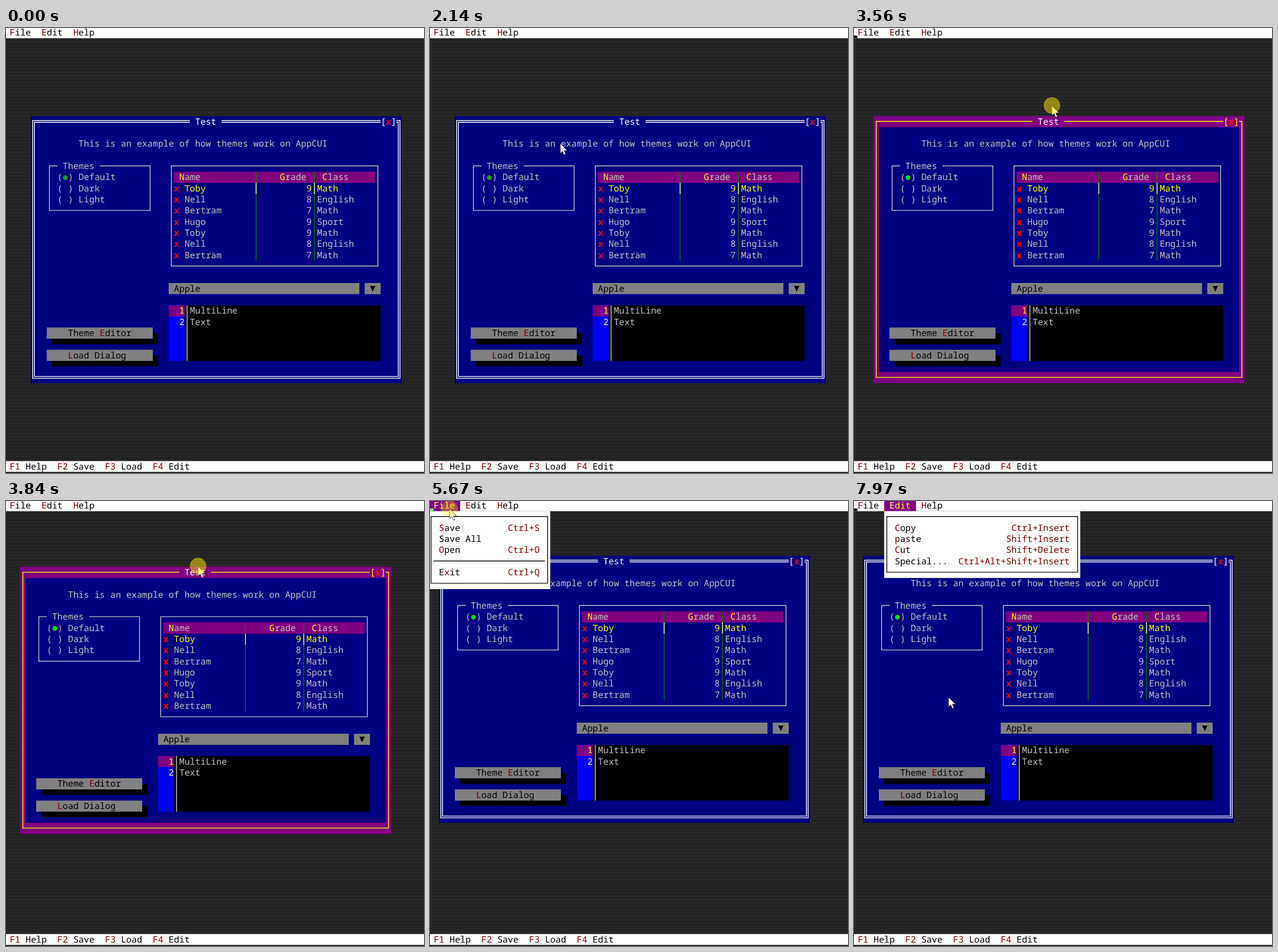
Recreate the animation shown at these times as an HTML page. Size 725 by 773 pixels, loop 8000 ms.

```html
<!DOCTYPE html>
<html lang="en">
<head>
<meta charset="utf-8">
<title>Theme demo</title>
<style>
html, body { margin: 0; width: 100%; height: 100%; overflow: hidden; background: #1e1e1e; }
svg { display: block; width: 725px; height: 773px; }
text { font: 15.32px "Noto Sans Mono", "DejaVu Sans Mono", monospace; white-space: pre; text-rendering: geometricPrecision; }
.line { fill: none; stroke-width: 1.4; }
.cross text { font-weight: 600; }
.bg { opacity: 0; }
.on > .bg { opacity: 1; }
.on text { fill: #ff0; }
.on tspan { fill: #ffffa0; }
</style>
</head>
<body>
<svg id="stage" viewBox="0 0 725 773"></svg>
<script>
// The screen is a grid of text cells.
const CW = 9.19, CH = 19.33, LEFT = -2.8, TOP = -1.6;
const X = c => +(c * CW + LEFT).toFixed(2);
const Y = r => +(r * CH + TOP).toFixed(2);
const midX = c => X(c + .5);
const midY = r => Y(r) + 9.2;
const colAt = x => Math.floor((x - LEFT) / CW);
const rowAt = y => Math.floor((y - TOP) / CH);

const SILVER = '#c0c0c0', NAVY = '#000080', PURPLE = '#800080', GRAY = '#808080',
      YELLOW = '#ffff00', MAROON = '#800000', RED = '#ff0000', INK = '#101018';

const box = (x0, y0, x1, y1, fill, cls = '') =>
  `<rect class="${cls}" x="${x0}" y="${y0}" width="${x1 - x0}" height="${y1 - y0}" fill="${fill}"/>`;
const cells = (c0, r0, c1, r1, fill, cls) => box(X(c0), Y(r0), X(c1), Y(r1), fill, cls);
const line = (d, color) => `<path class="line" d="${d}" stroke="${color}"/>`;
const frame = (c0, r0, c1, r1, color) =>
  line(`M${midX(c0)} ${midY(r0)}H${midX(c1)}V${midY(r1)}H${midX(c0)}Z`, color);

// One letter, at index hot, may take another colour.
function text(c, r, s, fill, hot = -1, hotFill = MAROON) {
  const body = hot < 0 ? s
    : `${s.slice(0, hot)}<tspan fill="${hotFill}">${s[hot]}</tspan>${s.slice(hot + 1)}`;
  return `<text x="${X(c)}" y="${Y(r) + 14.6}" fill="${fill}">${body}</text>`;
}
const cross = (c, r) => `<g class="cross">${text(c, r, 'x', RED)}</g>`;

// Window outline with gaps for the title and the close button; o moves it outward.
function outline(o) {
  const t = midY(8) - o;
  return `M${X(35)} ${t}H${midX(5) - o}V${midY(31) + o}H${midX(74) + o}V${t}H${X(74)}M${X(41)} ${t}H${X(71)}`;
}
const border = (id, back, path, color) => `<g id="${id}">${cells(5, 8, 75, 32, back)}
  ${cells(6, 9, 74, 31, NAVY)}${line(path, color)}${text(71, 8, '[ ]', color)}${cross(72, 8)}</g>`;

function themes() {
  const t = midY(12);
  return line(`M${X(10)} ${t}H${midX(8)}V${midY(16)}H${midX(27)}V${t}H${X(18)}`, SILVER)
    + text(11, 12, 'Themes', SILVER)
    + ['Default', 'Dark', 'Light'].map((s, i) => text(10, 13 + i, '( ) ' + s, SILVER)).join('')
    + `<circle id="dot" cx="${midX(11)}" cy="${Y(13) + 10.2}" r="4.2"/>`;
}

function list() {
  const pupils = [['Toby', 9, 'Math'], ['Nell', 8, 'English'], ['Bertram', 7, 'Math'], ['Hugo', 9, 'Sport']];
  let out = frame(31, 12, 70, 21, SILVER) + cells(32, 13, 70, 14, PURPLE)
    + text(33, 13, 'Name', SILVER, 0, YELLOW)
    + text(52, 13, 'Grade', SILVER, 0, YELLOW)
    + text(60, 13, 'Class', SILVER, 0, YELLOW);
  for (const c of [47, 58])
    out += line(`M${midX(c)} ${Y(13)}V${Y(21)}`, '#007800')
      + line(`M${midX(c)} ${Y(14)}V${Y(15)}`, '#ffff70');
  for (let i = 0; i < 7; i++) {
    const [name, grade, course] = pupils[i % 4], r = 14 + i, fill = i ? SILVER : YELLOW;
    out += cross(32, r) + text(34, r, name, fill)
      + text(57, r, String(grade), fill) + text(59, r, course, fill);
  }
  return out;
}

const combo = () => cells(31, 23, 67, 24, GRAY) + text(32, 23, 'Apple', '#000')
  + cells(68, 23, 71, 24, GRAY)
  + `<path d="M${midX(69) - 4.8} ${Y(23) + 5}h9.6l-4.8 10z"/>`;

const editor = () => cells(31, 25, 71, 30, '#000')
  + cells(31, 25, 34, 30, '#0000ff') + cells(31, 25, 34, 26, PURPLE)
  + line(`M${midX(34)} ${Y(25)}V${Y(30)}`, '#d8d0c0')
  + text(33, 25, '1', YELLOW) + text(33, 26, '2', '#fff')
  + text(35, 25, 'MultiLine', SILVER) + text(35, 26, 'Text', SILVER);

const button = (r, s, hot) => cells(9, r + .5, 29, r + 1.5, '#000')
  + cells(8, r, 28, r + 1, GRAY) + text(12, r, s, '#000', hot);

// An item is a label, its hot letter and a shortcut; an empty one is a rule.
function menu(id, c0, c1, items) {
  const last = items.length + 2;
  const rows = items.map(([label, hot, keys], i) => {
    const r = i + 2;
    if (!label) return line(`M${X(c0 + 1)} ${midY(r)}H${X(c1)}`, INK);
    return `<g class="item" data-row="${r}">${cells(c0 + 1, r, c1, r + 1, PURPLE, 'bg')}
      ${text(c0 + 2, r, label, '#000', hot)}${text(c1 - 1 - keys.length, r, keys, MAROON)}</g>`;
  });
  return `<g id="${id}">${cells(c0, 1, c1 + 1, last + 1, '#fff')}${frame(c0, 1, c1, last, INK)}${rows.join('')}</g>`;
}

const barItem = (id, c, s) =>
  `<g id="${id}">${cells(c - 1, 0, c + 5, 1, PURPLE, 'bg')}${text(c, 0, s, '#000', 0)}</g>`;
const hints = ['Help', 'Save', 'Load', 'Edit'].map((s, i) =>
  text(1 + 9 * i, 39, 'F' + (i + 1), MAROON) + text(4 + 9 * i, 39, s, '#000')).join('');

const el = id => document.getElementById(id);
el('stage').innerHTML = `
  <defs><pattern id="shade" width="${CW / 4}" height="${CH / 8}" patternUnits="userSpaceOnUse">
    <rect width="3" height="3" fill="#161616"/><rect width="3" height="1.2" fill="#343434"/></pattern></defs>
  <rect width="725" height="773" fill="url(#shade)"/>
  <g id="win">${border('still', NAVY, outline(1.5) + outline(-1.5), '#fff')}
    ${border('held', PURPLE, outline(0), YELLOW)}${text(36, 8, 'Test', '#fff')}
    ${text(14, 10, 'This is an example of how themes work on AppCUI', SILVER)}
    ${themes()}${list()}${combo()}${editor()}
    ${button(27, 'Theme Editor', 6)}${button(29, 'Load Dialog', 0)}</g>
  ${box(0, 0, 725, Y(1), '#fff')}
  ${barItem('file', 1, 'File')}${barItem('edit', 7, 'Edit')}${barItem('help', 13, 'Help')}
  ${menu('fileMenu', 0, 22, [['Save', 0, 'Ctrl+S'], ['Save All', -1, ''], ['Open', 0, 'Ctrl+O'],
    [], ['Exit', 1, 'Ctrl+Q']])}
  ${menu('editMenu', 6, 42, [['Copy', 0, 'Ctrl+Insert'], ['paste', 0, 'Shift+Insert'],
    ['Cut', 0, 'Shift+Delete'], ['Special...', -1, 'Ctrl+Alt+Shift+Insert']])}
  ${box(0, Y(39), 725, 771, '#fff')}${box(0, 771, 725, 773, '#2a2a2a')}${hints}
  <rect id="caret" y="13" width="6" height="4.5"/>
  <g id="mouse"><path d="M0 0V16.5L3.8 13l2.9 6.3 2.6-1.1-2.8-6.2H12Z" fill="#fff" stroke="#3c2838" stroke-width=".8"/>
    <circle id="ring" cy="-1" r="14.3" fill="#fff000"/></g>`;
const items = [...document.querySelectorAll('.item')];

const LOOP = 8000, GRAB = 2990, DROP = 4320;
const clamp = v => Math.min(1, Math.max(0, v));
const speedUp = f => f * f;
const slowDown = f => 1 - (1 - f) ** 2;
const smooth = f => f * f * (3 - 2 * f);

// Pointer moves: start, end, goal, easing.
const moves = [
  [630, 1110, 556, 463, smooth],
  [1310, 1800, 60, 290, smooth],
  [1800, 2140, 226, 201, smooth],
  [2140, 2880, 350, 150, smooth],
  [3080, 4060, 322, 90, speedUp],
  [4720, 5400, 34, 14, smooth],
  [5670, 6420, 100, 128, smooth],
  [6480, 6860, 68, 7, slowDown],
  [7290, 7970, 164, 341, smooth],
];
function pointer(t) {
  let x = 680, y = 682;
  for (const [t0, t1, gx, gy, ease] of moves) {
    const f = ease(clamp((t - t0) / (t1 - t0)));
    x += (gx - x) * f;
    y += (gy - y) * f;
  }
  return [x, y];
}
const pressed = (t, down, up) => t < down ? 0 : .5 * clamp(1 - (t - up) / 150);
const show = (id, yes) => { el(id).style.display = yes ? '' : 'none'; };

function draw(t) {
  const [x, y] = pointer(t);
  show('mouse', t >= 630);
  el('mouse').setAttribute('transform', `translate(${x.toFixed(2)} ${y.toFixed(2)})`);
  el('ring').setAttribute('opacity', pressed(t, GRAB, DROP) + pressed(t, 5400, 5620));

  // While held, the window follows the pointer by whole cells.
  const [gx, gy] = pointer(GRAB);
  const [wx, wy] = pointer(Math.min(DROP, Math.max(GRAB, t)));
  const dx = (colAt(wx) - colAt(gx)) * CW, dy = (rowAt(wy) - rowAt(gy)) * CH;
  el('win').setAttribute('transform', `translate(${dx} ${dy})`);
  const held = t >= GRAB && t < 4720;
  show('held', held);
  show('still', !held);
  el('dot').setAttribute('fill', t < GRAB ? '#08a80c' : '#00dc00');

  const fileOn = t >= 5300 && t < 6800, editOn = t >= 6800;
  el('file').classList.toggle('on', fileOn);
  el('edit').classList.toggle('on', editOn);
  show('fileMenu', fileOn && t >= 5400);
  show('editMenu', editOn);
  for (const it of items) it.classList.toggle('on', +it.dataset.row === rowAt(y));

  show('caret', t >= 3290 && (t - 3290) % 1060 < 530);
  el('caret').setAttribute('fill', fileOn ? '#7fff7f' : '#000');
}

const start = performance.now();
function tick() {
  draw((performance.now() - start) % LOOP);
  requestAnimationFrame(tick);
}
tick();
</script>
</body>
</html>
```
